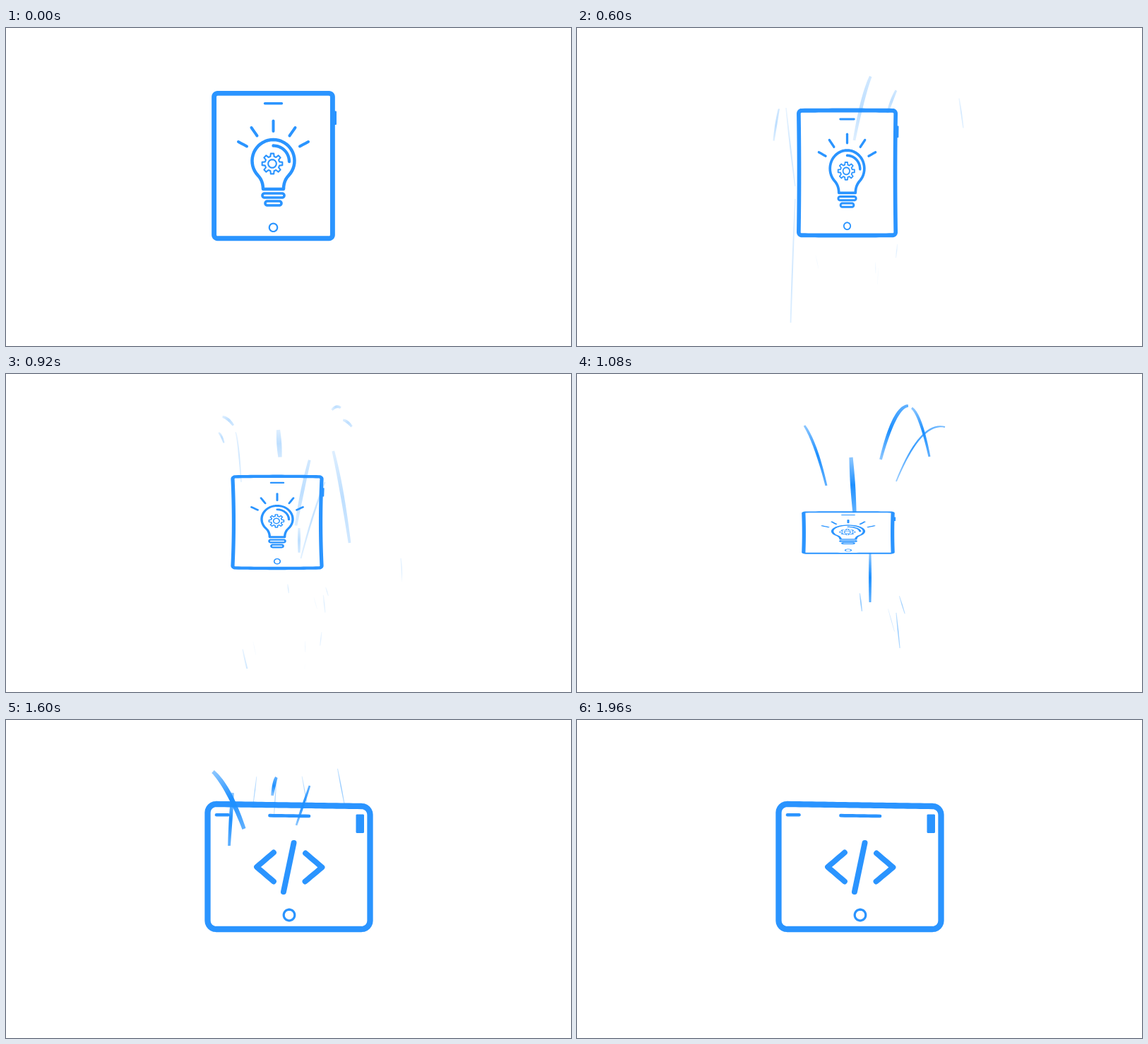
Animation of 800x450 px, one loop 2400 ms. Source, as an HTML page with a canvas:

```html
<!DOCTYPE html>
<html lang="en">
<head>
<meta charset="utf-8">
<title>Tablet morph</title>
<style>
  html, body { margin: 0; width: 100%; height: 100%; overflow: hidden; background: #fff; }
  canvas { display: block; width: 800px; height: 450px; }
</style>
</head>
<body>
<canvas id="stage" width="800" height="450"></canvas>
<script>
const ctx = document.getElementById('stage').getContext('2d');
const BLUE = '#2a94ff';
const LOOP = 2400, STEP = 40;
const LEAVE = 160, PINCH = 760, SWAP = 1160, SPRING = 1360, REST = 1960;
const REACH = 190;   // half the life of a streak
const TRAVEL = 320;  // time for a streak to move its own length

const clamp = u => Math.max(0, Math.min(1, u));
const smooth = u => u * u * (3 - 2 * u);
const span = (t, a, b) => clamp((t - a) / (b - a));

// The bulb tablet narrows, wobbles, then collapses into a flat strip
function bulbPose(t) {
  const a = span(t, LEAVE, PINCH), c = span(t, PINCH, SWAP) ** 1.47;
  const bow = 3.2 * Math.sin(1.5 * Math.PI * a) * (1 - c);
  return {
    x: 378.5 + 5.5 * a,
    y: 195 + 6.5 * a + 7 * Math.sin(Math.PI * a) + 32 * c,
    w: 175 - 43 * a,
    h: 212 - 38 * a ** .75 - 158 * c,
    bowX: bow, bowY: bow / 2
  };
}

// The code tablet opens wide and settles like a damped spring
function codePose(t) {
  let s = 0;
  if (t < SPRING) s = -.95 + .56 * smooth(span(t, SWAP, SPRING));
  else if (t < REST) {
    s = .194 * Math.exp((1600 - t) / 347) * Math.sin(Math.PI * (1600 - t) / 160);
  }
  const bend = Math.min(.3, -s);
  return {
    x: 400.5 + 4 * Math.min(0, s),
    y: 207.5 - 9 * Math.min(0, s),
    w: 239 * (1 - .18 * Math.max(-.5, s)),
    h: 185 * (1 + s),
    bowX: 32 * bend, bowY: 32 * bend
  };
}

function arc(cx, cy, r, from, to, n = 20) {
  return Array.from({ length: n + 1 }, (_, i) => {
    const a = from + (to - from) * i / n;
    return [cx + r * Math.cos(a), cy + r * Math.sin(a)];
  });
}
const ring = (x, y, r) => arc(x, y, r, 0, 2 * Math.PI, 28);

// Rounded box; tilt lowers the right end of its top edge
function box(x0, y0, x1, y1, r, tilt = 0) {
  const q = Math.PI / 2;
  return [
    ...arc(x0 + r, y0 + r, r, 2 * q, 3 * q, 6),
    ...arc(x1 - r, y0 + r + tilt, r, 3 * q, 4 * q, 6),
    ...arc(x1 - r, y1 - r, r, 0, q, 6),
    ...arc(x0 + r, y1 - r, r, q, 2 * q, 6)
  ];
}

function quad([x0, y0, x1, y1, x2, y2], u) {
  const v = 1 - u;
  return [
    v * v * x0 + 2 * u * v * x1 + u * u * x2,
    v * v * y0 + 2 * u * v * y1 + u * u * y2
  ];
}

// Returns a drawing function whose points are given in the resting layout
function makePen(ox, oy, w, h, pose) {
  const warp = ([x, y]) => {
    const u = (x - ox) * 2 / w, v = (y - oy) * 2 / h;
    return [
      x - ox + pose.bowX * u * (1 - v * v),
      y - oy - pose.bowY * v * (1 - u * u)
    ];
  };
  return (pts, lw, { close = false, fill = false } = {}) => {
    ctx.save();
    ctx.translate(pose.x, pose.y);
    ctx.scale(pose.w / w, pose.h / h);
    ctx.beginPath();
    const list = close ? [...pts, pts[0]] : pts;
    ctx.moveTo(...warp(list[0]));
    for (let i = 1; i < list.length; i++) {
      const [ax, ay] = list[i - 1], [bx, by] = list[i];
      const n = Math.ceil(Math.hypot(bx - ax, by - ay) / 6) || 1;
      for (let k = 1; k <= n; k++) {
        ctx.lineTo(...warp([ax + (bx - ax) * k / n, ay + (by - ay) * k / n]));
      }
    }
    if (close) ctx.closePath();
    ctx.lineWidth = lw;
    ctx.lineCap = ctx.lineJoin = 'round';
    ctx.strokeStyle = ctx.fillStyle = BLUE;
    if (fill) ctx.fill(); else ctx.stroke();
    ctx.restore();
  };
}

function gear(x, y) {
  const pts = [];
  for (let i = 0; i < 8; i++) {
    for (const [d, r] of [[-.25, 10.5], [-.15, 14.5], [.15, 14.5], [.25, 10.5]]) {
      const a = i * Math.PI / 4 + d;
      pts.push([x + r * Math.cos(a), y + r * Math.sin(a)]);
    }
  }
  return pts;
}

function bulbTablet(pose) {
  const pen = makePen(378.5, 195, 175, 212, pose);
  const shut = { close: true }, mid = 378.5;
  pen(box(294.6, 92.4, 462.4, 297.8, 5), 6.9, shut);
  pen(box(464, 117.5, 468, 137, 1), 0, { close: true, fill: true });
  pen([[366.5, 106.8], [390.5, 106.8]], 3.4);
  pen(ring(mid, 282.3, 5.7), 2.2, shut);

  // Rays
  pen([[mid, 131.5], [mid, 146]], 4);
  for (const s of [-1, 1]) {
    pen([[mid + s * 31, 141], [mid + s * 23, 152.5]], 4);
    pen([[mid + s * 49.5, 161], [mid + s * 37.5, 167.5]], 4);
  }

  // Glass, highlight, gear and socket
  const glass = arc(mid, 188, 30, Math.PI * .76, Math.PI * 2.24, 36);
  const neck = s => Array.from({ length: 7 }, (_, i) =>
    quad([mid + s * 21.9, 208.5, mid + s * 14.5, 216, mid + s * 14.5, 228], i / 6));
  pen([...neck(-1).reverse(), ...glass, ...neck(1)], 4.5, shut);
  pen(arc(mid, 189, 22.5, -Math.PI / 2, 0), 4.3);
  pen(gear(377, 192), 2.1, shut);
  pen(ring(377, 192, 5.8), 2.1, shut);
  pen(box(363, 234, 394, 240, 3), 3.6, shut);
  pen(box(367, 245, 390, 251, 3), 3.6, shut);
}

function codeTablet(pose) {
  const pen = makePen(400.5, 207.5, 239, 185, pose);
  const shut = { close: true };
  pen(box(285.5, 119, 515.5, 296, 12, 3), 8.3, shut);
  pen([[298, 134.2], [314.5, 134.2]], 4.5);
  pen([[373.5, 135.2], [429, 136]], 4.7);
  pen(box(495.5, 133.5, 507, 160, 1.5), 0, { close: true, fill: true });
  pen(ring(401, 276, 7.8), 3.2, shut);
  pen([[379, 187.5], [355, 208], [379, 228.5]], 7.8);
  pen([[407.5, 174], [393, 243]], 8);
  pen([[424, 188.5], [447.5, 208.5], [423.5, 228.5]], 7.8);
}

let seed = 11;
const random = () => (seed = seed * 16807 % 2147483647) / 2147483647;
const between = (a, b) => a + (b - a) * random();

// Each streak is a thrown arc: start, end, lift and line width.
// Thin falling lines are scattered around the given height.
const bursts = [];
function burst(at, drizzleY, ...streaks) {
  for (let i = 0; i < 4; i++) {
    const x = between(340, 480), y = drizzleY + between(-20, 20);
    streaks.push([x, y, x + between(-8, 10), y + between(25, 50), 0, between(.6, 1.6)]);
  }
  bursts.push({ at, streaks });
}

burst(400, 320, [408, 305, 459, 391, -32, 1.6]);
burst(760, 345,
  [286, 114, 301, 83, 20, 3],
  [309, 240, 325, 82, 100, 2],
  [309, 225, 335, 389, -20, 2],
  [416, 68, 463, 108, 74, 5],
  [452, 88, 477, 65, 14, 4],
  [547, 142, 559, 260, 11, 1.8]);
burst(1080, 320,
  [322, 73, 353, 158, 20, 4],
  [388, 118, 393, 196, 0, 7],
  [430, 121, 469, 45, 37, 5],
  [474, 48, 499, 117, 25, 4],
  [452, 152, 521, 75, 47, 2.5],
  [415, 253, 415, 323, 0, 4]);
burst(1400, 110,
  [265, 150, 295, 72, 45, 4],
  [318, 197, 327, 282, 0, 3],
  [374, 72, 374, 146, 0, 9],
  [384, 78, 393, 167, 0, 6],
  [416, 130, 457, 41, 42, 3]);
burst(1600, 85,
  [293, 73, 337, 154, 20, 7],
  [321, 103, 316, 178, 10, 5],
  [377, 107, 383, 81, 8, 5],
  [411, 149, 430, 93, 0, 3.5]);

function drawStreak([x0, y0, x2, y2, lift, w], dt) {
  const path = [x0, y0, (x0 + x2) / 2, (y0 + y2) / 2 - lift, x2, y2];
  const age = dt / REACH, shift = dt / TRAVEL;
  // Grows from its tail, then shrinks towards its head
  const from = shift + Math.max(0, age) * .6;
  const to = 1 + shift + Math.min(0, age) * .6;
  const left = [], right = [], n = 20;
  for (let i = 0; i <= n; i++) {
    const u = from + (to - from) * i / n;
    const [x, y] = quad(path, u);
    const [ax, ay] = quad(path, u - .01), [bx, by] = quad(path, u + .01);
    const len = Math.hypot(bx - ax, by - ay) || 1;
    const half = w / 2 * (.75 + .25 * Math.sin(Math.PI * i / n));
    const nx = (ay - by) / len * half, ny = (bx - ax) / len * half;
    left.push([x + nx, y + ny]);
    right.unshift([x - nx, y - ny]);
  }
  const grad = ctx.createLinearGradient(...quad(path, from), ...quad(path, to));
  [.5, 1, .7].forEach((a, i) => grad.addColorStop(i / 2, `rgba(30,144,255,${a})`));
  ctx.globalAlpha = (1 - age * age) * Math.min(1, w * .35);
  ctx.fillStyle = grad;
  ctx.beginPath();
  [...left, ...right].forEach(p => ctx.lineTo(...p));
  ctx.fill();
}

function drawStreaks(t) {
  ctx.save();
  ctx.beginPath();
  ctx.rect(260, 34, 301, 383);
  ctx.clip();
  for (const { at, streaks } of bursts) {
    const dt = t - at;
    if (Math.abs(dt) < REACH) streaks.forEach(s => drawStreak(s, dt));
  }
  ctx.restore();
}

function draw(now) {
  const t = Math.floor((now % LOOP) / STEP) * STEP;
  ctx.fillStyle = '#fff';
  ctx.fillRect(0, 0, 800, 450);
  if (t < SWAP) bulbTablet(bulbPose(t));
  else codeTablet(codePose(t));
  drawStreaks(t);
}

const start = performance.now();
function tick() {
  draw(performance.now() - start);
  requestAnimationFrame(tick);
}
tick();
</script>
</body>
</html>
```
